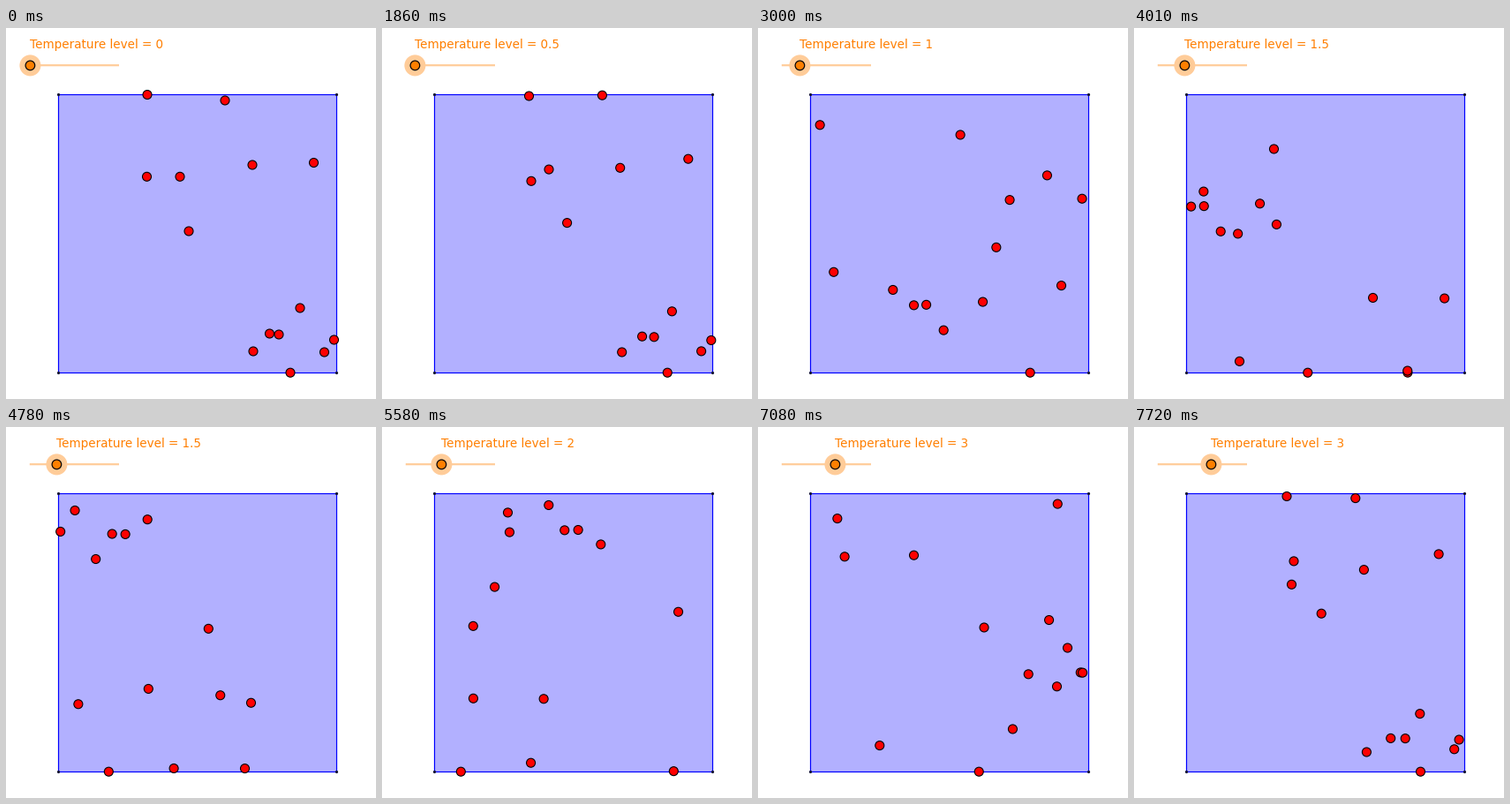
These frames come from a looping animation (419 px wide and 420 px high, 7820 ms). A matplotlib script:

```python
import numpy as np
import matplotlib.pyplot as plt
from matplotlib.animation import FuncAnimation
from matplotlib.patches import Circle, Rectangle

W, H, DPI = 419, 420, 64
PX = 72 / DPI                       # points per pixel
LOOP, TICK = 7820, 20               # ms
PAUSE, STEP, LAST = 1860, 57.4, 102  # rest and step length in ms, last step
BOX = np.array([59.5, 75.5])        # top left corner of the container
SIDE = 315
ORANGE, PALE = "#ff7f00", "#ffcc99"

# each particle at rest: x, y and its first displacement
START = np.array([
    (160, 75.5, 6.5, 1.5), (248, 82, 1.4, -5.8), (159.5, 168.3, 9.5, 5),
    (197, 168.3, -8, -8.2), (207, 230, 2.6, -9.4), (279, 155, -9.3, 3.3),
    (348.5, 152.5, -1.7, -4.3), (333, 317, -4.6, 3.8), (298.5, 346, -3.9, 3.2),
    (309, 347, -0.9, 2.8), (280, 366, -8.3, 1), (371.5, 353, 4.7, 0.5),
    (360.5, 367, 1.1, -1.1), (322, 390.2, 1.25, 0)])
rest, drift = START[:, :2], START[:, 2:]

# whole round trips between the walls, so every path closes over the loop
trips = np.sign(drift) * np.maximum(1, np.rint(np.abs(drift) * LAST / (2 * SIDE)))


def fold(p):
    """Reflect points at the walls of the container."""
    d = (p - BOX) % (2 * SIDE)
    return BOX + np.minimum(d, 2 * SIDE - d)


def positions(step):
    if step < 0:
        return fold(rest)
    return fold(rest + drift + (2 * SIDE * trips + drift) * step / LAST)


def step_at(ms):
    return min(LAST, int((ms - PAUSE) // STEP)) if ms >= PAUSE else -1


fig = plt.figure(figsize=(W / DPI, H / DPI), dpi=DPI, facecolor="white")
ax = fig.add_axes([0, 0, 1, 1])
ax.set_xlim(0, W)
ax.set_ylim(H, 0)
ax.axis("off")


def dot(center, radius, color, edge=0.0, z=3):
    return ax.add_patch(Circle(center, radius, facecolor=color, zorder=z,
                               edgecolor="black" if edge else "none",
                               linewidth=edge * PX))


ax.add_patch(Rectangle(BOX, SIDE, SIDE, facecolor="#b2b0ff", edgecolor="#0000ff",
                       linewidth=1.2 * PX, snap=False, zorder=1))
for corner in (0, 0), (1, 0), (0, 1), (1, 1):
    dot(BOX + SIDE * np.array(corner), 1.6, "#101030")
balls = [dot(p, 5, "#ff0000", 1.1, z=4) for p in rest]

ax.plot([26.8, 128], [42.2, 42.2], color=PALE, lw=2.2 * PX, zorder=1,
        solid_capstyle="butt", snap=False)
halo = dot((27, 42), 12, PALE, z=2)
knob = dot((27, 42), 5.3, ORANGE, 1.2)
label = ax.text(27, 23, "", color=ORANGE, fontsize=13.5 * PX,
                family="DejaVu Sans", va="baseline")


def draw(frame):
    step = step_at(frame * TICK)
    level = 0.5 * (1 + step // 18)
    x = 27.4 + 20 * level
    for ball, p in zip(balls, positions(step)):
        ball.set_center(p)
    halo.set_center((x, 42.4))
    knob.set_center((x, 42.4))
    label.set_x(x - 0.6)
    label.set_text(f"Temperature level = {level:g}")
    return *balls, halo, knob, label


anim = FuncAnimation(fig, draw, frames=LOOP // TICK, interval=TICK,
                     repeat=True, repeat_delay=0)
plt.show()
```
